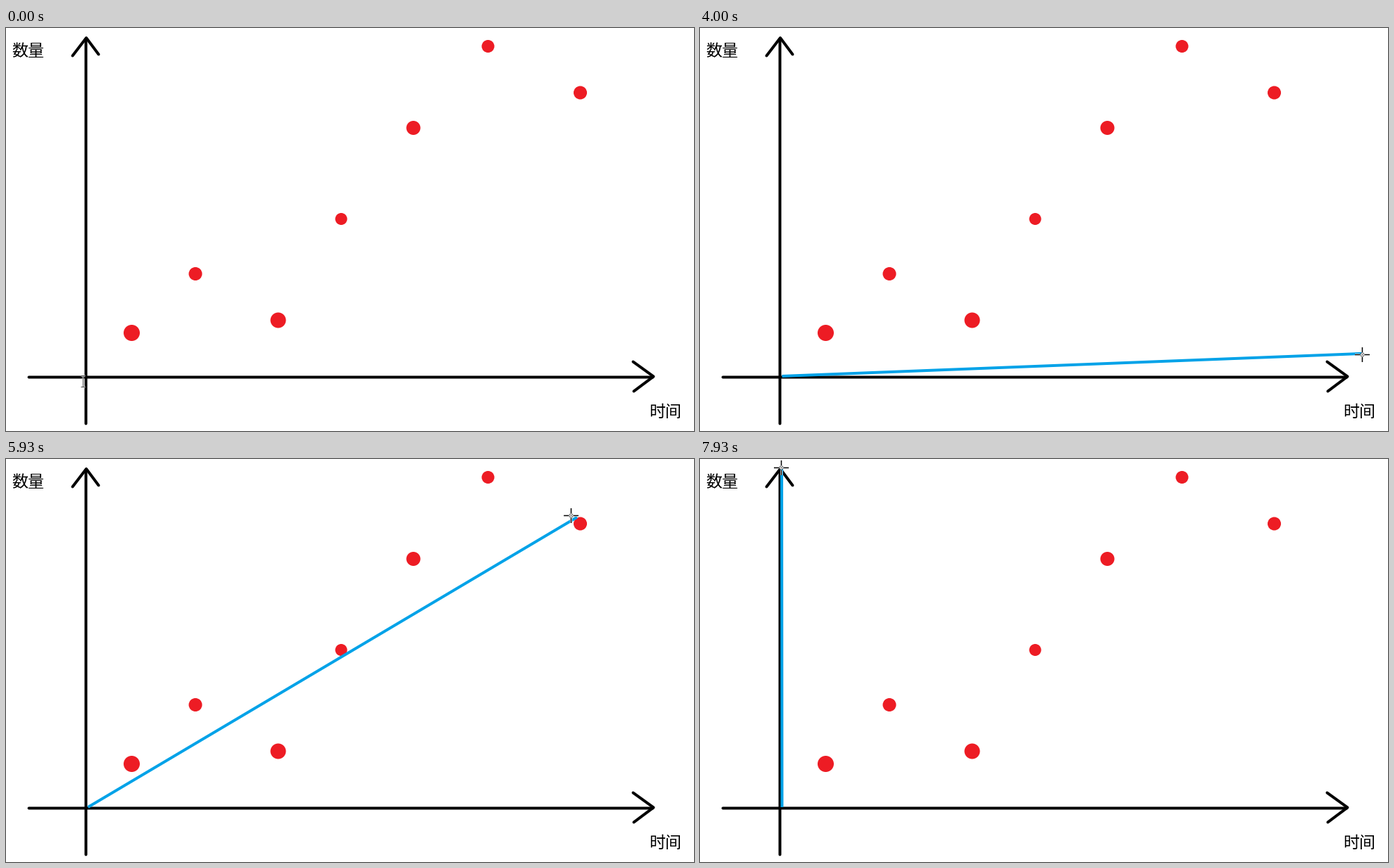
Animation, 977 px wide and 573 px high, one loop 8 s. Source, as a matplotlib script:

```python
import numpy as np
import matplotlib.pyplot as plt
from matplotlib.animation import FuncAnimation
from matplotlib.patches import Circle

W, H, DPI = 977, 573, 64
PX = 72 / DPI                      # one pixel in points
LOOP, STEP = 8000, 40              # ms
RATE = 15                          # pointer updates per second
BLACK, RED, BLUE = "#000000", "#ED1C24", "#00A2E8"
SHOW_CROSS, DRAG = 8, 43           # ticks: pointer changes, drag begins
ORIGIN = (116, 494.5)

# Key points of the pointer: tick, x, y
KEYS = np.array([
    (7, 112, 500), (10, 198, 25), (12, 179, 185), (27, 179, 185),
    (38, 118, 496), (DRAG, 118, 496), (56, 912, 459), (60, 940, 464),
    (69, 962, 455), (72, 963, 414), (75, 961, 394), (83, 920, 174),
    (96, 588, 20), (108, 184, 9), (119, 115, 12),
], float)

# Data points: x, y, radius
DOTS = [(178, 433, 11.5), (268.5, 349, 9.5), (386, 415, 11), (475.5, 271, 8.5),
        (578, 141.5, 10), (684, 25.5, 9), (815, 91.5, 9.5)]

fig = plt.figure(figsize=(W / DPI, H / DPI), dpi=DPI, facecolor="white")
ax = fig.add_axes([0, 0, 1, 1])
ax.set_xlim(-0.5, W - 0.5)         # whole numbers are pixel centres
ax.set_ylim(H - 0.5, -0.5)
ax.axis("off")


def stroke(points, color, width, z, cap="round"):
    x, y = zip(*points) if points else ((), ())
    line, = ax.plot(x, y, color=color, lw=width * PX, zorder=z,
                    solid_capstyle=cap, solid_joinstyle="round")
    line.set_snap(False)
    return line


def label(x, y, text):
    ax.text(x, y, text, family="Noto Sans CJK JP", size=23 * PX,
            color=BLACK, va="baseline", zorder=1)


def disc(x, y, r, z, **style):
    return ax.add_patch(Circle((x, y), r, zorder=z, **style))


def segments(*parts):
    """Join separate line parts into one array with gaps."""
    gap = [(np.nan, np.nan)]
    return np.array([p for part in parts for p in list(part) + gap], float)


def smooth(t, ts, vs):
    """Cubic through the key points that never overshoots them."""
    slope = np.diff(vs) / np.diff(ts)
    a, b = slope[:-1], slope[1:]
    same = a * b > 0
    inner = np.where(same, 2 * a * b / np.where(same, a + b, 1), 0)
    tangent = np.concatenate([[0], inner, [0]])
    k = np.clip(np.searchsorted(ts, t, side="right") - 1, 0, len(ts) - 2)
    h = ts[k + 1] - ts[k]
    u = np.clip((t - ts[k]) / h, 0, 1)
    ease = u * u * (3 - 2 * u)
    return (vs[k] + (vs[k + 1] - vs[k]) * ease
            + h * u * (1 - u) * (tangent[k] * (1 - u) - tangent[k + 1] * u))


def pointer(tick):
    ts, xs, ys = KEYS.T
    return smooth(tick, ts, xs), smooth(tick, ts, ys)


# Chart
stroke([(113, 15), (113, 562)], BLACK, 4, 1)
stroke([(32, 496), (918, 496)], BLACK, 4, 1)
stroke([(94, 39), (113.5, 13.5), (131, 37)], BLACK, 4, 1)
stroke([(890, 474), (919, 495), (891, 516)], BLACK, 4, 1)
label(7.5, 40, "数量")
label(912.5, 552.5, "时间")
for x, y, r in DOTS:
    disc(x, y, r, 2, color=RED, lw=0)

fit = stroke([], BLUE, 4, 3, "butt")

# Pointers, each a dark core on a white halo
CROSS = segments(*([(dx * r, dy * r) for r in (3.5, 10.5)]
                   for dx, dy in [(1, 0), (-1, 0), (0, 1), (0, -1)]))
IBEAM = segments([(0, -8), (0, 8)], *([(-3, y), (3, y)] for y in (-8, 8)))
cross = [stroke([], "white", 3, 5, "butt"), stroke([], BLACK, 1.5, 6, "butt")]
ibeam = [stroke([], "white", 2, 5, "butt"), stroke([], "#4a4a4a", 1, 6, "butt")]
bullseye = [disc(0, 0, 2.6, 7, fc="white", ec="#555555", lw=PX),
            disc(0, 0, 0.7, 8, fc=BLACK, lw=0)]


def place(lines, shape, x, y, visible):
    for line in lines:
        line.set_data(shape[:, 0] + x, shape[:, 1] + y)
        line.set_visible(visible)


def update(i):
    # Half a step ahead, so each tick shows on its nearest step
    tick = int((i * STEP + 23) * RATE / 1000)
    crossed = tick >= SHOW_CROSS

    x, y = np.round(pointer(tick))
    place(cross, CROSS, x, y, crossed)
    for patch in bullseye:
        patch.center = (x, y)
        patch.set_visible(crossed)

    nudge = min(tick, 1)
    place(ibeam, IBEAM, 109 + nudge, 502 + 2 * nudge, not crossed)

    # The rubber-band line trails the pointer slightly
    tx, ty = pointer(tick - 0.3)
    fit.set_data([ORIGIN[0], tx + 0.5], [ORIGIN[1], ty - 1.5])
    fit.set_visible(tick > DRAG)
    return [fit, *cross, *ibeam, *bullseye]


anim = FuncAnimation(fig, update, frames=LOOP // STEP, interval=STEP,
                     init_func=lambda: update(0), repeat=True, repeat_delay=0)
plt.show()
```
